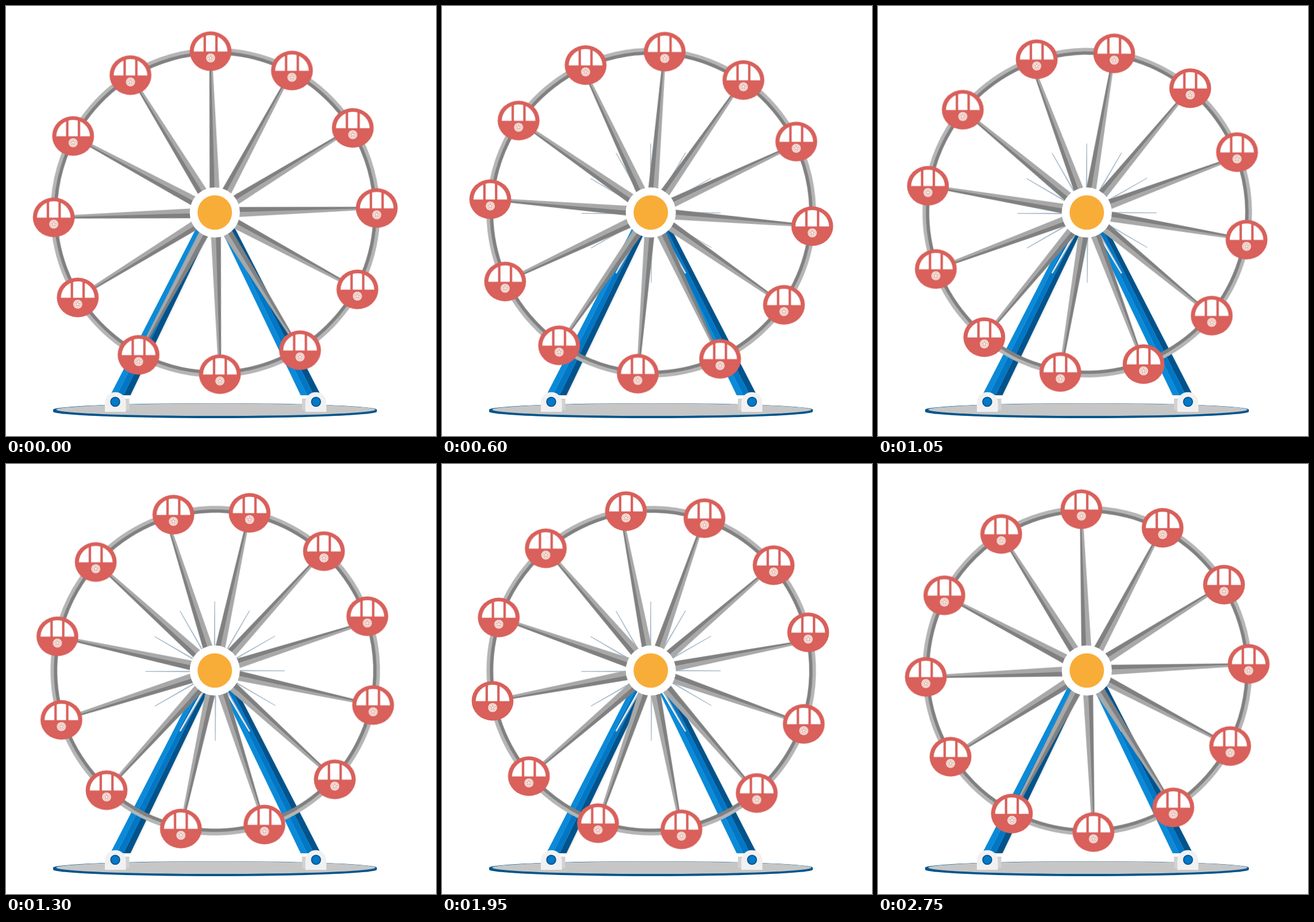
An HTML page that plays this animation: 748x748 px, repeating every 2.8 s.

```html
<!DOCTYPE html>
<html lang="en">
<head>
<meta charset="utf-8">
<title>Ferris wheel</title>
<style>
  html, body { margin: 0; width: 100%; height: 100%; overflow: hidden; background: #fff; }
  svg { display: block; width: 100vw; height: 100vh; }
  .legs { filter: drop-shadow(1px 1px 1.5px rgba(0, 0, 0, .14)); }
</style>
</head>
<body>
<svg viewBox="0 0 748 748">
  <defs>
    <g id="spoke">
      <path d="M0 0H-9.7L-2.2-281H0Z" fill="#808080"/>
      <path d="M0 0H9.7L2.2-281H0Z" fill="#a8a8a8"/>
    </g>
    <g id="ray">
      <path d="M0 0V-121H1.6L3 0Z" fill="#fff"/>
      <path d="M-2-40L-1.2-121H.2L.4-40Z" fill="#adbfce"/>
    </g>
    <g id="cabin">
      <ellipse rx="36.4" ry="34.5" fill="#d9605b"/>
      <path d="M-29.3 .6A29.3 28.5 0 0 1 29.3 .6Z" fill="#fff"/>
      <path d="M-10.2-30V2M10.2-30V2" stroke="#d9605b" stroke-width="4.2"/>
      <g transform="translate(0 11.7)">
        <circle r="7.8" fill="#f8ebe6"/>
        <circle r="5.7" fill="none" stroke="#e2a596" stroke-width=".9"/>
        <path id="star" fill="#fff" stroke="#d98c7e" stroke-width=".9"/>
      </g>
    </g>
    <g id="foot">
      <path d="M17 683H24.5V703H17Z" fill="#d2d2d2"/>
      <path d="M-18 706V690A18.3 18.3 0 0 1 18.6 690V706Z" fill="#f1f1f2"/>
      <circle cy="688.5" r="7.8" fill="#0079c8" stroke="#00528c" stroke-width="1.8"/>
    </g>
  </defs>
  <path d="M82 702.2A281.5 11.2 0 0 1 645 702.2V705.4A281.5 11.6 0 0 1 82 705.4Z" fill="#00558c"/>
  <ellipse cx="365" cy="702.2" rx="277.5" ry="10.9" fill="#c6c6c6"/>
  <g class="legs" id="legs"></g>
  <use href="#foot" transform="translate(190 0)"/>
  <use href="#foot" transform="translate(539.3 0) scale(-1 1)"/>
  <g id="rays" transform="translate(363.6 360.2)"></g>
  <g transform="translate(364 359.5)">
    <g id="wheel">
      <g fill="none" stroke-width="6">
        <circle r="283.6" stroke="#b5b5b5"/>
        <circle r="277.8" stroke="#808080"/>
      </g>
    </g>
    <g id="cabins"></g>
  </g>
  <circle cx="363.2" cy="359.2" r="43.6" fill="#fff"/>
  <circle cx="363.2" cy="359.2" r="30" fill="#f9ad39"/>
</svg>
<script>
  const COUNT = 12, GAP = 360 / COUNT, START = -1.65, RADIUS = 281;
  const TIMING = { duration: 2800, iterations: Infinity, easing: 'steps(56, end)' };
  // Two cabins change speed midway: one runs ahead of its spoke, one lags.
  const DRIFT = { 2: { at: .75, by: -3.2 }, 11: { at: .5, by: 2.9 } };
  const $ = id => document.getElementById(id);

  function add(parent, tag, attrs = {}) {
    const el = document.createElementNS('http://www.w3.org/2000/svg', tag);
    for (const key in attrs) el.setAttribute(key, attrs[key]);
    return parent.appendChild(el);
  }

  // Turns el by one gap; sign -1 undoes the same turn to keep cabins upright.
  function turn(el, from, { at, by } = { at: .5, by: 0 }, sign = 1) {
    const pose = (offset, angle) => ({ offset, transform: `rotate(${sign * angle}deg)` });
    el.animate([
      pose(0, from),
      pose(at, from + GAP * at + by),
      pose(1, from + GAP)
    ], TIMING);
  }

  // Each leg is shaded in three lengthwise bands.
  const bands = [[0, .32, '#0a8ad8'], [.32, .66, '#0077c6'], [.66, 1, '#00538c']];
  function leg(topL, topR, lowL, lowR) {
    const mix = (a, b, k) => a + (b - a) * k;
    for (const [a, b, fill] of bands) {
      add($('legs'), 'path', {
        fill,
        d: `M${mix(topL, topR, a)} 360H${mix(topL, topR, b)}` +
           `L${mix(lowL, lowR, b)} 677H${mix(lowL, lowR, a)}Z`
      });
    }
  }
  leg(344.6, 368.6, 181.5, 216.5);
  leg(360.4, 384.4, 512.5, 547.5);

  const points = Array.from({ length: 10 }, (_, i) => {
    const r = i % 2 ? 1.8 : 4, a = i * Math.PI / 5;
    return `${r * Math.sin(a)} ${-r * Math.cos(a)}`;
  });
  $('star').setAttribute('d', `M${points.join('L')}Z`);

  for (let i = 0; i < COUNT; i++) {
    const transform = `rotate(${i * GAP})`, from = START + i * GAP;
    add($('rays'), 'use', { href: '#ray', transform });
    add($('wheel'), 'use', { href: '#spoke', transform });

    const arm = add($('cabins'), 'g');
    const hook = add(arm, 'g', { transform: `translate(0 ${-RADIUS})` });
    const cabin = add(hook, 'use', { href: '#cabin' });
    turn(arm, from, DRIFT[i]);
    turn(cabin, from, DRIFT[i], -1);
  }
  turn($('wheel'), START);
</script>
</body>
</html>
```
